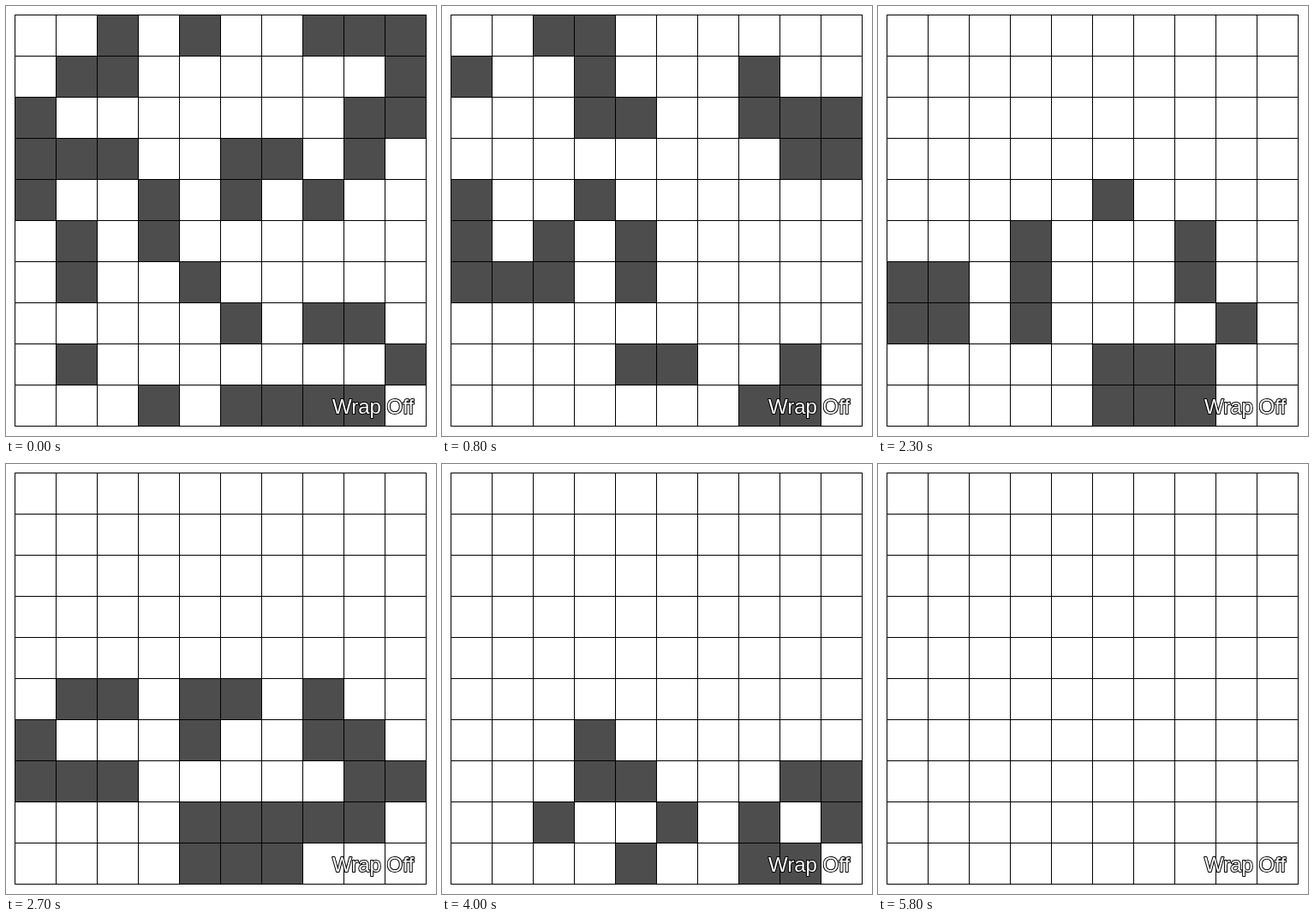
An HTML page with a canvas for the animation above (6 s loop, 502 by 502 pixels).

```html
<!DOCTYPE html>
<html>
<head>
<meta charset="utf-8">
<title>Game of Life</title>
<style>
html, body { margin: 0; overflow: hidden; background: #fff; }
canvas { display: block; }
</style>
</head>
<body>
<canvas width="502" height="502"></canvas>
<script>
const SIZE = 10, CELL = 48, ORIGIN = 10, LOOP = 6000;
const ctx = document.querySelector('canvas').getContext('2d');

const seed = [
  '..#.#..###',
  '.##......#',
  '#.......##',
  '###..##.#.',
  '#..#.#.#..',
  '.#.#......',
  '.#..#.....',
  '.....#.##.',
  '.#.......#',
  '...#.####.'
].map(row => [...row].map(c => +(c === '#')));

// Start of each generation, in tenths of a second
const starts = [0, 2, 4, 6, 8, 10, 12, 14, 15, 17, 19, 21, 23, 25, 27, 29,
  30, 32, 34, 36, 38, 40, 42, 43, 45, 47, 49, 51, 53, 54, 57, 58];

// Conway's rules on a board whose edges do not wrap
function step(grid) {
  return grid.map((row, y) => row.map((alive, x) => {
    let n = -alive;
    for (let dy = -1; dy <= 1; dy++)
      for (let dx = -1; dx <= 1; dx++) n += grid[y + dy]?.[x + dx] ?? 0;
    return +(n === 3 || (alive && n === 2));
  }));
}

const generations = [seed];
while (generations.length < starts.length) generations.push(step(generations.at(-1)));

function draw(grid) {
  ctx.fillStyle = '#fff';
  ctx.fillRect(0, 0, 502, 502);

  ctx.fillStyle = '#4d4d4d';
  grid.forEach((row, y) => row.forEach((alive, x) => {
    if (alive) ctx.fillRect(ORIGIN + x * CELL, ORIGIN + y * CELL, CELL, CELL);
  }));

  ctx.fillStyle = '#000';
  for (let i = 0; i <= SIZE; i++) {
    const p = ORIGIN + i * CELL, length = SIZE * CELL + 1;
    ctx.fillRect(p, ORIGIN, 1, length);
    ctx.fillRect(ORIGIN, p, length, 1);
  }

  ctx.font = '24px "Liberation Sans", Arial, sans-serif';
  ctx.lineJoin = 'round';
  ctx.lineWidth = 2;
  ctx.strokeStyle = '#000';
  ctx.strokeText('Wrap Off', 381, 476);
  ctx.fillStyle = '#fff';
  ctx.fillText('Wrap Off', 381, 476);
}

function tick() {
  const t = performance.now() % LOOP;
  draw(generations[starts.findLastIndex(s => s * 100 <= t)]);
  requestAnimationFrame(tick);
}
tick();
</script>
</body>
</html>
```
